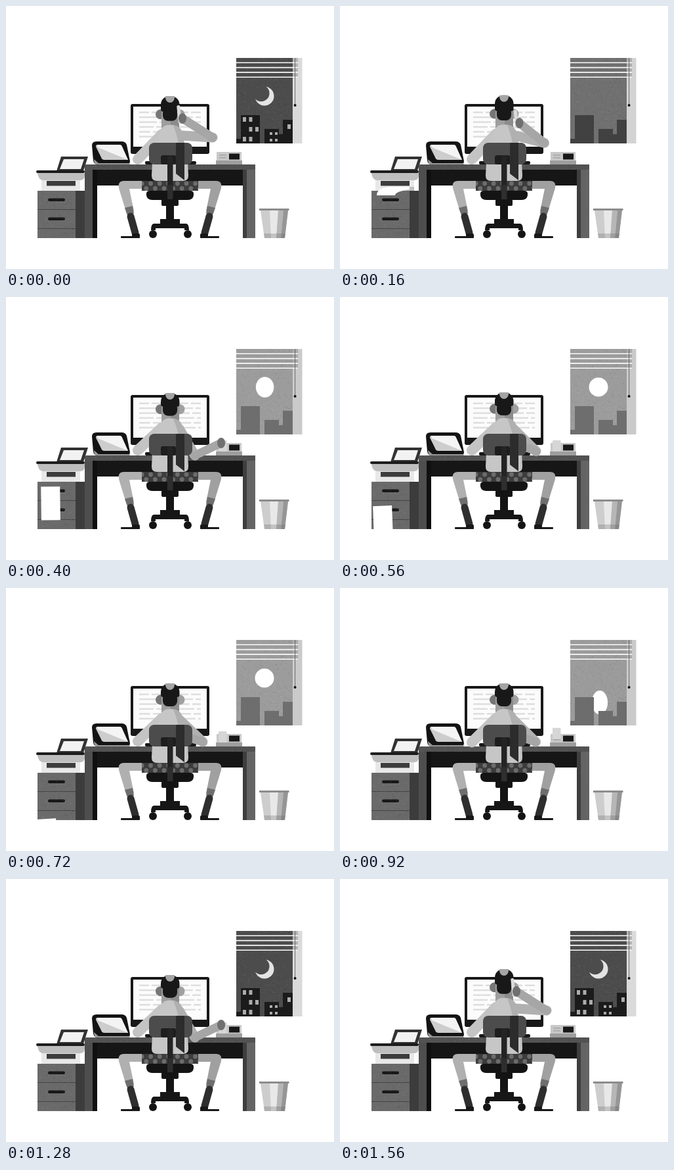
Write an HTML page with a canvas that moves like this. It is 500 px wide and 400 px high and loops after 1.6 s.

```html
<!DOCTYPE html>
<html lang="en">
<head>
<meta charset="utf-8">
<title>Night and day at the desk</title>
<style>
html, body { margin: 0; width: 100%; height: 100%; overflow: hidden; background: #fff; }
canvas { display: block; }
</style>
</head>
<body>
<canvas id="stage" width="500" height="400"></canvas>
<script>
const ctx = document.getElementById('stage').getContext('2d');
const LOOP = 1600;

const grey = v => `rgb(${v},${v},${v})`;
const mix = (a, b, k) => a + (b - a) * k;
const clamp = k => Math.max(0, Math.min(1, k));
const ramp = (t, start, length) => clamp((t - start) / length);
const ease = (t, start, length) => {
  const k = ramp(t, start, length);
  return k * k * (3 - 2 * k);
};

function rect(shade, x, y, x2, y2, radius = 0) {
  ctx.fillStyle = grey(shade);
  ctx.beginPath();
  ctx.roundRect(x, y, x2 - x, y2 - y, radius);
  ctx.fill();
}
function shape(shade, d) {
  ctx.fillStyle = grey(shade);
  ctx.fill(new Path2D(d));
}
function oval(shade, x, y, rx, ry = rx) {
  ctx.fillStyle = grey(shade);
  ctx.beginPath();
  ctx.ellipse(x, y, rx, ry, 0, 0, 7);
  ctx.fill();
}
function limb(shade, width, x, y, x2, y2) {
  ctx.strokeStyle = grey(shade);
  ctx.lineWidth = width;
  ctx.lineCap = 'round';
  ctx.beginPath();
  ctx.moveTo(x, y);
  ctx.lineTo(x2, y2);
  ctx.stroke();
}
function clipped(x, y, x2, y2, draw) {
  ctx.save();
  ctx.beginPath();
  ctx.rect(x, y, x2 - x, y2 - y);
  ctx.clip();
  draw();
  ctx.restore();
}

// Fixed paper grain
function grain(x, y, x2, y2) {
  let seed = 7;
  const random = () => (seed = seed * 16807 % 2147483647) / 2147483647;
  const count = (x2 - x) * (y2 - y) / 16;
  for (let i = 0; i < count; i++) {
    ctx.fillStyle = i % 2 ? 'rgba(255,255,255,.06)' : 'rgba(0,0,0,.06)';
    ctx.fillRect(mix(x, x2, random()), mix(y, y2, random()), 1.5, 1.5);
  }
}

// Sun and moon share one move: drop behind the skyline, then rise and settle.
function drawOrb(t, sky, isDay) {
  const p = t % 800, rising = p > 170;
  const pull = rising ? 1 - ramp(p, 170, 290) : ramp(p, 30, 140);
  const drop = rising ? 1 - ramp(p, 170, 240) : pull;
  const x = 394 + 3 * pull, y = 137 + 88 * drop * drop;
  const rx = 14.5 * (1 - .25 * pull), ry = 14.5 * (1 + .4 * pull);
  oval(isDay ? 255 : 228, x, y, rx, ry);
  if (isDay) return;
  ctx.save();
  ctx.beginPath();
  ctx.ellipse(x, y, rx + 1, ry + 1, 0, 0, 7);
  ctx.clip();
  oval(sky, x - rx * .35, y - ry * .3, rx * .87, ry * .87);
  ctx.restore();
}

function drawLitWindows(t) {
  for (let i = 0; i < 9; i++) {
    if (t > 40 + i * 10 && t < 1150 + i * 10) continue;
    const col = i % 3, row = Math.floor(i / 3);
    if ((col + row * 2) % 4 !== 2) rect(172, 361 + col * 9.5, 169 + row * 15, 366 + col * 9.5, 176 + row * 15);
    if (i < 4) rect(172, 402 + i % 2 * 8, 192 + (i >> 1) * 10, 406 + i % 2 * 8, 196 + (i >> 1) * 10);
    if (i === 8) rect(172, 429, 180, 434, 187);
  }
}

function drawWindow(t) {
  const day = ramp(t, 120, 90) - ramp(t, 920, 90);
  const sky = mix(76, 156, day);
  rect(sky, 351, 79, 437, 209);
  grain(351, 79, 437, 209);
  clipped(351, 79, 437, 209, () => {
    drawOrb(t, sky, day > .5);
    shape(mix(27, 110, day), 'M351 202H358V166H387V209H394V187H416V195H422V173H437V209H351Z');
    drawLitWindows(t);
  });
  rect(mix(218, 202, day), 437, 79, 451.5, 209);
  rect(mix(180, 170, day), 437, 79, 445, 109);
  for (let y = 85.5; y < 109; y += 7.3) rect(250, 351, y, 445, y + 1.6);
  rect(80, 440.3, 79, 441.1, 150);
  oval(20, 440.6, 151, 2);
}

function drawMonitor() {
  rect(24, 190, 149, 310, 225, 3);
  rect(252, 194, 153, 306, 214);
  for (let i = 0; i < 6; i++) {
    const y = 160.5 + i * 7.4, split = 218 + i * 17 % 22, split2 = 278 + i * 7 % 12;
    rect(222, 203, y, split, y + 2.5);
    rect(222, split + 4, y, 243, y + 2.5);
    rect(222, 257, y, split2, y + 2.5);
    rect(222, split2 + 4, y, 297, y + 2.5);
  }
  rect(30, 236, 225, 264, 238);
  rect(24, 212, 236, 290, 241, 2);
}

function drawPaper(t) {
  const out = ease(t, 60, 180), fall = (t - 310) / 410;
  if (t < 60 || t > 750) return;
  clipped(40, 274, 120, 353, () => {
    if (fall < 0) {
      const low = mix(275, 297, out) + Math.max(0, t - 240) * .5;
      shape(190, 'M84 275H113V281H84Z');
      shape(255, `M106 275H78Q56 276 56 ${low}H84Q84 282 106 279Z`);
    } else {
      ctx.translate(84 - 8 * fall, 276 + 74 * fall ** 1.2);
      ctx.rotate(-.06 * fall);
      rect(255, -29, 0, 0, 51);
    }
  });
}

function drawCabinet(t) {
  shape(50, 'M84 229H125L118 251H77Z');
  shape(242, 'M88 233H119L114 248H82Z');
  rect(106, 48, 281, 120, 353);
  rect(232, 54, 262, 113, 281);
  shape(190, 'M48 254H120V259Q119 265 113 265H56Q49 264 48 254Z');
  rect(60, 62, 266, 106, 273.5);
  rect(28, 46, 250, 120, 254, 2);
  for (const y of [309, 338]) {
    rect(55, 48, y, 106, y + .8);
    rect(24, 64, y - 16.5, 90, y - 12, 2.2);
  }
  grain(48, 281, 106, 353);
  rect(60, 106, 281, 120, 353);
  drawPaper(t);
}

function drawDesk() {
  shape(20, 'M138 206H176Q182 206 184 211L189 236Q189 241 184 241H140Q134 241 133 235L131 212Q131 206 138 206Z');
  shape(150, 'M134 233L141 239H188L189 241H138Q134 240 134 233Z');
  shape(205, 'M139 211H173Q176 211 177 214L186 234H150Q146 234 145 230L137 214Q137 211 139 211Z');
  shape(244, 'M139 211H173Q176 211 177 214L186 234L140 215Z');
  rect(82, 120, 241, 380, 249);
  rect(22, 132, 249, 368, 273);
  rect(78, 120, 249, 132, 353);
  rect(16, 132, 249, 139, 353);
  rect(100, 361, 249, 380, 353);
  rect(62, 361, 249, 367, 353);
  grain(120, 241, 380, 249);
}

function drawBin() {
  shape(205, 'M388 311H430L425 353H394Z');
  shape(232, 'M402 311H415L412 353H404Z');
  shape(182, 'M415 311H423L419 353H412Z');
  shape(150, 'M423 311H430L425 353H419Z');
  ctx.globalAlpha = .25;
  shape(90, 'M393 346H426L425 353H394Z');
  ctx.globalAlpha = 1;
  rect(140, 386, 308, 431.5, 311);
}

// Arm poses: elbow x, y, hand x, y, head offset
const poses = [
  [315, 200, 269, 171, -8],  // phone at the ear
  [304, 226, 283, 193, -12], // phone held aside
  [288, 241, 328, 222, 1],   // hand on the phone base
  [300, 234, 262, 222, 0]    // typing
];
const reach = t => 2 * ease(t, 80, 320) + ease(t, 470, 110) - ease(t, 910, 190) - 2 * ease(t, 1300, 200);

function poseAt(step) {
  const i = Math.min(2, Math.floor(step));
  return poses[i].map((v, n) => mix(v, poses[i + 1][n], step - i));
}

function drawPhone(t, step) {
  rect(200, 321, 222, 359, 236, 1);
  rect(158, 320, 235, 360, 241);
  rect(24, 340, 224.5, 356, 233.5);
  for (const y of [226, 230]) rect(165, 325, y, 336, y + 1.5);
  if (step < 2) return;
  const ring = ramp(t, 880, 240);
  const hop = 6 * Math.abs(Math.sin(ring * Math.PI * 2)) ;
  rect(214, 324, 218 - hop, 336.5, 235 - hop, 1);
}

function drawLegs() {
  for (const side of [1, -1]) {
    ctx.save();
    ctx.translate(250, 0);
    ctx.scale(side, 1);
    shape(side > 0 ? 160 : 176, 'M43 266H70Q80 266 78 277L66 316L55 312L62 278H43Z');
    shape(110, 'M57 304L69 307L65 318L55 316Z');
    limb(46, 11, 60, 320, 53, 345);
    rect(24, 46, 346, 58, 353, 2);
    rect(24, 46, 350, 75, 353, 1);
    ctx.restore();
  }
}

function drawHead(top, ear) {
  oval(118, 235.5, ear, 7.5);
  oval(160, 265, ear, 7.5);
  rect(158, 237, ear - 10, 264, 205, 4);
  rect(140, 251, ear - 10, 264, 205, 4);
  rect(24, 236, top, 264.5, ear - 4, [13, 13, 4, 4]);
  rect(24, 239, ear - 10, 261, ear + 10, 8);
  clipped(236, top, 265, top + 20, () => oval(165, 250, top + 2, 7, 8));
}

function drawHandset(x, y, turn) {
  ctx.save();
  ctx.translate(x - 5, y - 6);
  ctx.rotate(turn);
  rect(218, -2.5, -14, 2.5, 14, 2);
  ctx.restore();
}

function drawPerson(t, step) {
  const [elbowX, elbowY, handX, handY, headY] = poseAt(step);
  const lift = headY * .4, top = 187 + lift;
  const tap = 1.5 * Math.max(0, step - 2) * Math.sin(t / 80 * Math.PI);

  drawHead(145 + headY, 170 + headY * .65);
  limb(196, 16, 238, 198 + lift, 201, 233 - tap);
  limb(176, 15, 264, 200 + lift, elbowX + tap, elbowY);
  limb(166, 13, elbowX + tap, elbowY, handX, handY);
  if (step < 2) drawHandset(handX, handY, -.1 + Math.max(0, step - 1) * 1.4);
  oval(112, handX, handY, 6, 8);

  shape(198, `M236 ${top + 6}Q238 ${top - 3} 250 ${top - 3}Q264 ${top - 3} 267 ${top + 6}Q278 225 278 258Q278 266 270 266H230Q222 266 222 258Q222 225 236 ${top + 6}Z`);
  shape(176, `M255 ${top - 2}Q264 ${top - 2} 268 ${top + 6}Q274 215 275 235H262Q268 215 255 ${top - 2}Z`);
}

function drawChair() {
  rect(76, 218, 208, 284, 241, 8);
  shape(44, 'M259 208H272V265L259 255Z');
  rect(60, 207, 266, 293, 281);
  clipped(207, 266, 293, 281, () => {
    for (let i = 0; i < 14; i++) oval(108, 207 + i * 6.8, 270 + i % 2 * 7.5, 3.4);
  });
  rect(30, 236, 227, 259, 241, 3);
  rect(36, 246, 227, 254.5, 299, 4);
  shape(20, 'M218 281H282Q287 282 286 288Q285 295 277 295H223Q215 295 214 288Q213 282 218 281Z');
  rect(46, 246, 272, 254.5, 299, 4);
  rect(20, 237, 294, 263, 304, 2);
  rect(20, 244, 295, 256, 332);
  shape(22, 'M235 324H265V331H275Q279 332 279 341H272V338H228V341H221Q221 332 225 331H235Z');
  for (const x of [224, 277]) oval(20, x, 347, 6);
}

function frame(now) {
  const t = now % LOOP, step = reach(t);
  rect(255, 0, 0, 500, 400);
  drawWindow(t);
  drawMonitor();
  drawCabinet(t);
  drawDesk();
  drawBin();
  drawPhone(t, step);
  drawLegs();
  drawPerson(t, step);
  drawChair();
  requestAnimationFrame(frame);
}
requestAnimationFrame(frame);
</script>
</body>
</html>
```
